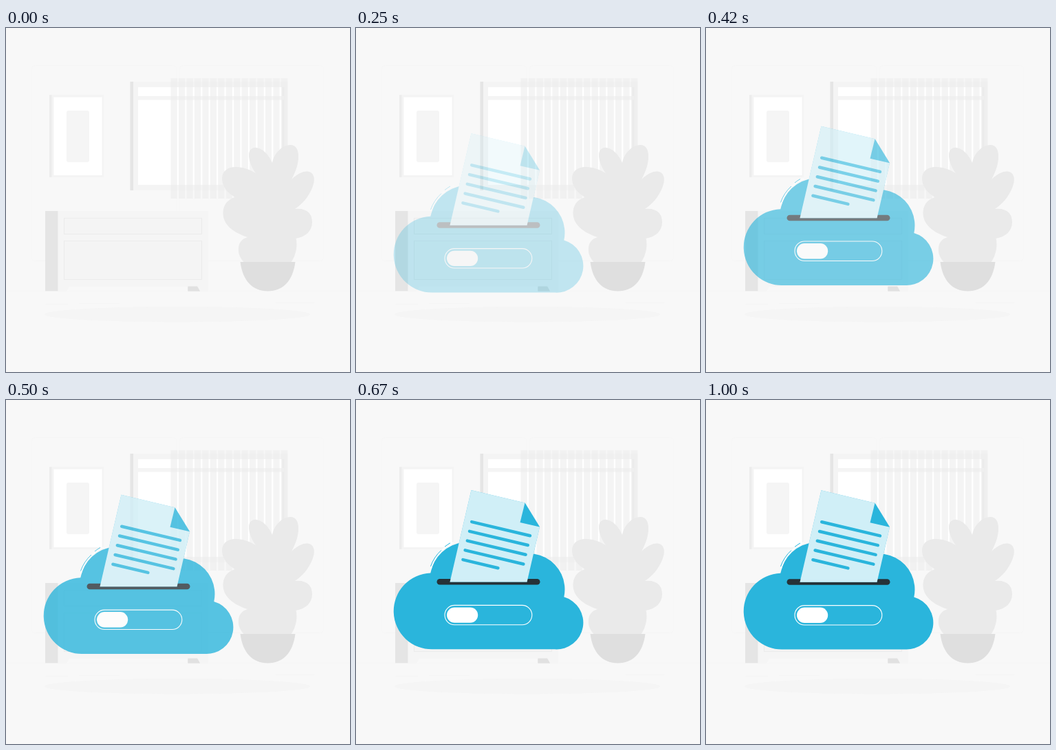
An HTML page for the animation above (1.04 s loop, 500 by 500 pixels).

```html
<!DOCTYPE html>
<html lang="en">
<head>
<meta charset="utf-8">
<title>Cloud document</title>
<style>
  html, body { margin: 0; width: 100%; height: 100%; overflow: hidden; background: #f8f8f8; }
  svg { display: block; width: 100vw; height: 100vh; }
  .blue { fill: #2ab5dc; }
  .white { fill: #fff; }
  .frame { fill: #f4f4f4; }
</style>
</head>
<body>
<svg viewBox="0 0 500 500">
  <!-- room -->
  <g fill="none" stroke="#f5f5f5" stroke-width=".8">
    <rect x="37.500" y="54.500" width="210" height="284" rx="5"/>
    <rect x="252.500" y="54.500" width="209" height="284" rx="5"/>
    <path d="M0 382.400H500M392 399.500H448M57 401.500H90M106 400.500H165"/>
  </g>
  <ellipse cx="249" cy="416.200" rx="193.500" ry="11.300" fill="#f5f5f5"/>

  <!-- picture -->
  <rect class="frame" x="63" y="97" width="79" height="120"/>
  <rect x="63" y="97.500" width="3.500" height="119" fill="#ececec"/>
  <rect class="white" x="69.500" y="100.500" width="70" height="113.500"/>
  <rect x="88" y="120" width="33" height="75" rx="3" fill="#f5f5f5"/>

  <!-- window -->
  <rect x="404" y="78" width="6" height="158" fill="#f5f5f5"/>
  <rect class="frame" x="180.500" y="78" width="224" height="158"/>
  <rect x="180.500" y="78" width="4.500" height="158" fill="#e5e5e5"/>
  <rect class="white" x="192" y="86" width="209.500" height="142"/>
  <rect x="401.500" y="86" width="3" height="142" fill="#ebebeb"/>
  <rect class="frame" x="192" y="99" width="212" height="5.500"/>
  <g id="blind" fill="#ebebeb" opacity=".5"></g>

  <!-- cabinet -->
  <path d="M264.500 375.500H278L282 382.400H264.500Z" fill="#e1e1e1"/>
  <path d="M75 266H294.500V382.400H282L278 376H92L88 382.400H75Z" fill="#f5f5f5"/>
  <path d="M264.500 375.500H278L282 382.400H264.500Z" fill="#e1e1e1"/>
  <rect x="57" y="266" width="18.500" height="116.400" fill="#e5e5e5"/>
  <g fill="#f4f4f4" stroke="#ebebeb" stroke-width=".9">
    <rect x="84.500" y="276.300" width="200" height="23.200"/>
    <rect x="84.500" y="309.300" width="200" height="56.200"/>
  </g>

  <!-- plant -->
  <path fill="#eaeaea" d="M346 341C340 334 337 327 338 319C339 311 344 306 351 304
    C330 297 315 286 315.500 268C316 257 322 249 333 246C322 240 314 230 314 219
    C314 208 322 202 334 202C345 202 355 206 363 211C357 203 353 193 353 185
    C353 177 358 173 364 174C373 175 382 184 387 196C390 181 402 170 413 170
    C422 170 425 177 425 187C425 198 421 209 415 220C422 213 431 208 438 208.500
    C446 209 449 216 447.500 224C445 238 434 254 420 263C436 261 445 269 445 282
    C445 294 437 303 421.500 306C424 315 422 330 414 341Z"/>
  <path fill="#dfdfdf" d="M340.500 340H420.500C417 368 402 382.500 380.500 382.500S344 368 340.500 340Z"/>

  <g id="cloud" opacity="0">
    <path class="blue" d="M112 362.500A55.200 55.200 0 0 1 108.300 251.700A55 55 0 0 1 213 240
      A52.200 52.200 0 0 1 302.300 286.500A38.800 38.800 0 0 1 289 362.500Z"/>
    <g fill="none">
      <path d="M109 246A55.600 55.600 0 0 1 142 207.500" stroke="#fff" stroke-width="1.600"/>
      <path d="M108.500 242A57.500 57.500 0 0 1 124 218.500M129 213.500A57.500 57.500 0 0 1 137 208"
        stroke="#2ab5dc"/>
    </g>
    <rect x="117.500" y="260.200" width="150" height="8.600" rx="4.300" fill="#263238"/>
    <path class="blue" d="M167.500 131.300L245.500 149.700L267 184.700L248.500 264.700H136.500Z"/>
    <path class="white" opacity=".78" d="M167.500 131.300L245.500 149.700L267 184.700L248.500 264.700H136.500Z"/>
    <path class="blue" d="M245.500 149.700L267 184.700L238.500 178.200Z"/>
    <g id="lines" stroke="#2ab5dc" stroke-width="4.500" stroke-linecap="round"></g>
    <rect x="129" y="298.600" width="126.800" height="28.400" rx="14.200" fill="none" stroke="#fff" stroke-width="1.100"/>
    <rect class="white" x="132" y="301.600" width="45.200" height="22.400" rx="11.200"/>
  </g>
</svg>
<script>
  const $ = id => document.getElementById(id);
  const LOOP = 1040, FPS = 24, RISE = 30;

  function add(parent, tag, attrs) {
    const el = document.createElementNS('http://www.w3.org/2000/svg', tag);
    for (const key in attrs) el.setAttribute(key, attrs[key]);
    parent.append(el);
  }

  for (let i = 0; i < 15; i++) {
    add($('blind'), 'rect', { x: 239.5 + i * 11.45, y: 73, width: 9.3, height: 175 });
  }
  add($('blind'), 'rect', { x: 239.5, y: 73, width: 170, height: 13, opacity: 0.3 });

  for (let i = 0; i < 5; i++) {
    const x = 168.2 - i * 3.2, y = 177.3 + i * 13.75, w = i < 4 ? 84.8 : 51;
    add($('lines'), 'line', { x1: x, y1: y, x2: x + w, y2: y + w * 0.237 });
  }

  const bezier = (a, b, s) => 3 * a * s * (1 - s) ** 2 + 3 * b * s * s * (1 - s) + s ** 3;

  // cubic-bezier(.36, -.01, .5, 1.38): overshoots before settling
  function ease(x) {
    let lo = 0, hi = 1;
    for (let i = 0; i < 30; i++) {
      const mid = (lo + hi) / 2;
      if (bezier(0.36, 0.5, mid) < x) lo = mid; else hi = mid;
    }
    return bezier(-0.01, 1.38, lo);
  }

  function draw(ms) {
    const step = Math.floor((ms + 5) * FPS / 1000 + 1e-6);
    const p = step < 4 ? 0 : ease(Math.min(1, (step + 0.5) / FPS));
    $('cloud').setAttribute('opacity', Math.max(0, Math.min(1, p)));
    $('cloud').setAttribute('transform', `translate(0 ${RISE * (1 - p)})`);
  }

  const start = performance.now();
  function tick() {
    draw((performance.now() - start) % LOOP);
    requestAnimationFrame(tick);
  }
  draw(0);
  requestAnimationFrame(tick);
</script>
</body>
</html>
```
